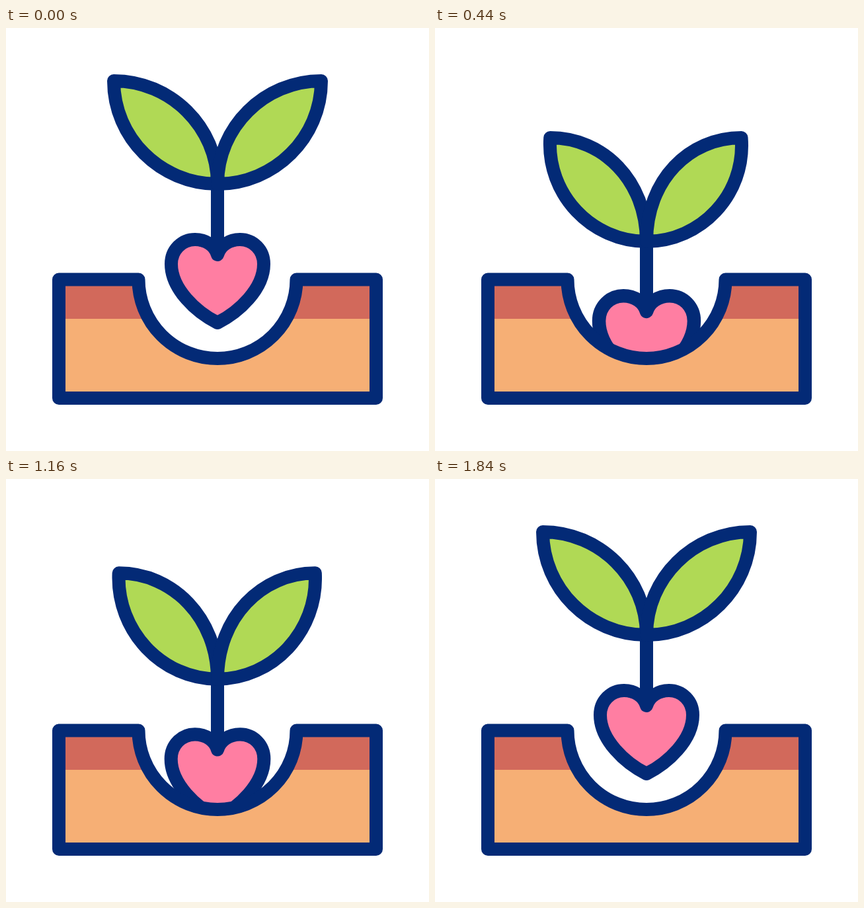
Write an HTML page that moves like this. It is 640x640 px and loops after 1.88 s.

```html
<!DOCTYPE html>
<html lang="en">
<head>
<meta charset="utf-8">
<title>Growing heart</title>
<style>
html, body { margin: 0; width: 100%; height: 100%; overflow: hidden; background: #fff; }
svg { display: block; width: 100%; height: 100%; }
.line { stroke: #032a76; stroke-width: 20; stroke-linejoin: round; stroke-linecap: round; }
</style>
</head>
<body>
<svg viewBox="0 0 640 640">
  <defs>
    <path id="soil" d="M80 380.5H200.5A119.5 119.5 0 0 0 439.5 380.5H560V560H80Z"/>
    <clipPath id="top"><path d="M70 370H570V440H70Z"/></clipPath>
  </defs>
  <g id="plant">
    <path id="heart" class="line" fill="#ff7ea2" d="M320 343C316 329 302 320 286 320C266 320 250 336 250 357C250 395 288 430 320 446C352 430 390 395 390 357C390 336 374 320 354 320C338 320 324 329 320 343Z"/>
    <path class="line" d="M320 236V341"/>
    <path id="left" class="line" fill="#b0d955"/>
    <path id="right" class="line" fill="#b0d955"/>
  </g>
  <use href="#soil" fill="#f6af75"/>
  <use href="#soil" fill="#d2695b" clip-path="url(#top)"/>
  <use href="#soil" class="line" fill="none"/>
</svg>
<script>
const LOOP = 1880, STEP = 40;
const $ = id => document.getElementById(id);

const ramp = (t, from, to) => Math.min(1, Math.max(0, (t - from) / (to - from)));
const easeOut = u => Math.sin(u * Math.PI / 2);
const easeInOut = u => (1 - Math.cos(u * Math.PI)) / 2;

// Leaf from the stem to its tip; lean pulls the tip inward and rounds the edges
function leaf(side, lean, rise) {
  const w = 157 - lean, h = 156 + rise, k = 0.55;
  const at = (x, y) => `${320 + side * x} ${236 - y}`;
  return `M${at(0, 0)}C${at(k * w + lean * 0.2, 0)} ${at(w + lean * 0.5, h * (1 - k))} ${at(w, h)}` +
    `C${at(w * (1 - k), h)} ${at(0, k * h + lean * 0.5)} ${at(0, 0)}Z`;
}

function draw(now) {
  const t = Math.floor(now % LOOP / STEP) * STEP;
  const fall = easeInOut(ramp(t, 0, 360));
  const swell = ramp(t, 240, 600);
  const relax = ramp(t, 600, 1120);
  const leap = easeOut(ramp(t, 1120, 1540));
  const settle = easeInOut(ramp(t, 1540, 1680));

  const drop = 87 * fall - 5 * relax ** 2 - 103 * leap + 21 * settle;
  const scale = 1 + 0.05 * (swell - relax) + 0.03 * (leap - settle);
  const fallLean = 18 * Math.sin(Math.PI * ramp(t, 0, 560));
  const leapLean = 29 * (leap ** 0.7 - settle);
  const lean = fallLean + leapLean;
  const rise = 0.08 * fallLean + 0.56 * leapLean;

  $("plant").setAttribute("transform", `translate(0 ${drop})`);
  $("heart").setAttribute("transform", `translate(320 383) scale(${scale}) translate(-320 -383)`);
  $("left").setAttribute("d", leaf(-1, lean, rise));
  $("right").setAttribute("d", leaf(1, lean * 1.2, rise));
}

const start = performance.now();
function tick() {
  draw(performance.now() - start);
  requestAnimationFrame(tick);
}
tick();
</script>
</body>
</html>
```
